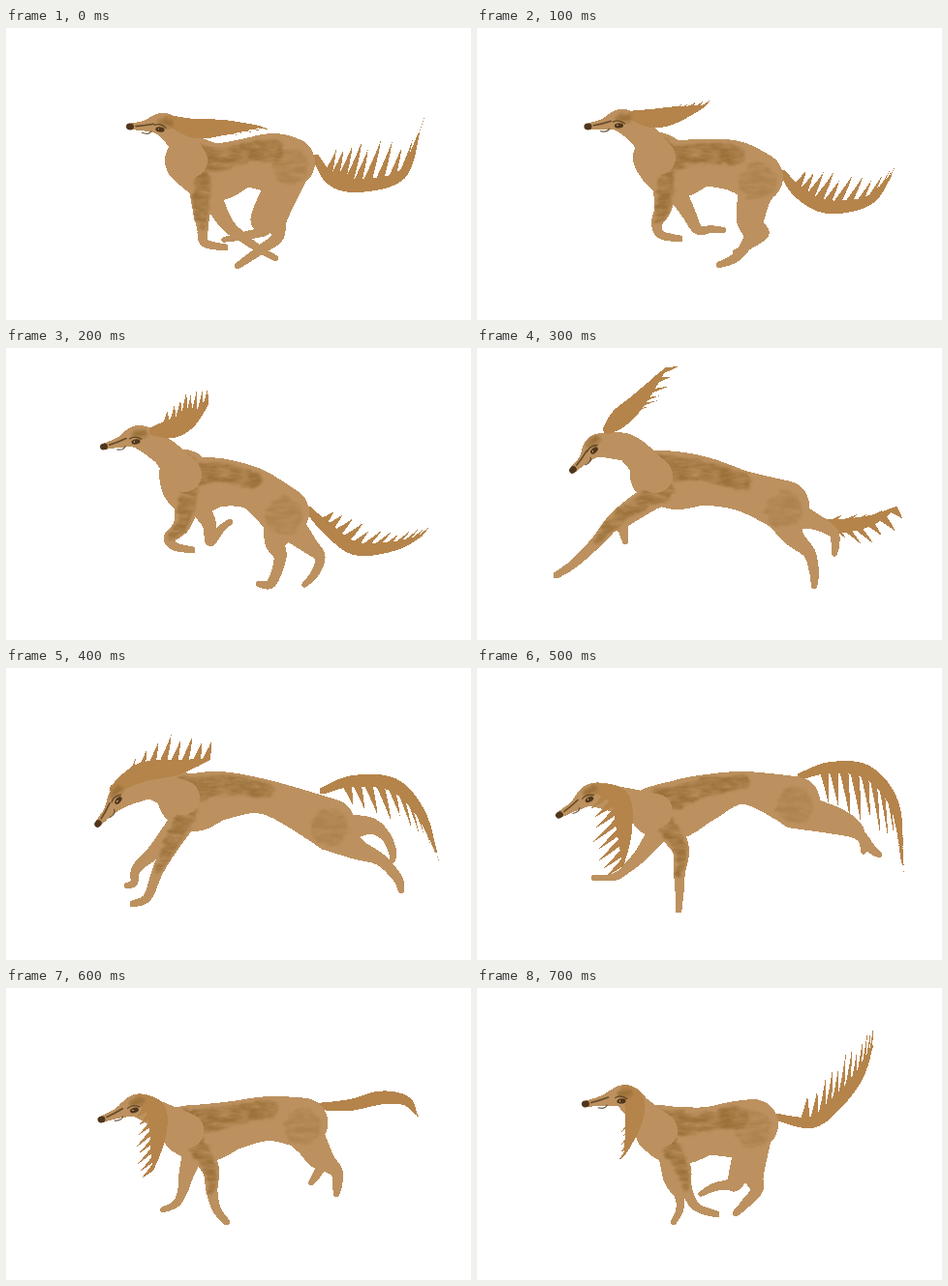
Animation, 480 px wide and 302 px high, one loop 800 ms. Source, as an HTML page:

```html
<!DOCTYPE html>
<html lang="en">
<head>
<meta charset="utf-8">
<title>Running hound</title>
<style>
html, body { margin: 0; width: 100%; height: 100%; overflow: hidden; background: #fff; }
svg { display: block; width: 100%; height: 100%; }
.body { fill: #bc915f; shape-rendering: crispEdges; }
.hair { fill: #b5844b; shape-rendering: crispEdges; }
.shade { fill: #9c723b; filter: url(#fur); }
.dark { fill: #4f361c; }
.line { fill: none; stroke: #4f361c; stroke-linecap: round; }
</style>
</head>
<body>
<svg id="stage" viewBox="0 0 480 302">
  <filter id="fur" x="-20%" y="-20%" width="140%" height="140%" color-interpolation-filters="sRGB">
    <feTurbulence type="fractalNoise" baseFrequency=".06 .18" numOctaves="3" seed="4" result="noise"/>
    <feColorMatrix in="noise" values="0 0 0 0 0  0 0 0 0 0  0 0 0 0 0  1.6 0 0 0 -.1" result="mottle"/>
    <feDisplacementMap in="SourceGraphic" in2="noise" scale="9" xChannelSelector="R" yChannelSelector="G"/>
    <feGaussianBlur stdDeviation="1"/>
    <feComposite in2="mottle" operator="in"/>
  </filter>
</svg>
<script>
const STEP = 100;

// Thickness along each part, shared by all poses.
const RADII = {
  head: [3.2, 5.5, 12, 14, 24],
  front: [15, 9, 6, 4.5, 3.5],
  hind: [20, 11, 6.5, 5, 3.2],
  tail: [3.5, 6, 7, 5, 1],
  ear: [5, 10, 8, 1]
};

const points = text => text.split(' ').map(pair => pair.split(',').map(Number));

// head: nose, skull, neck; trunk: chest to rump; legs: joints below shoulder or hip.
// tail and ear: centre line; the hair vectors give the pull of their strands.
function pose(head, trunk, waist, tail, tailHair, ear, earHair, front, hind, farFront, farHind) {
  const parts = { head, trunk, tail, tailHair, ear, earHair, front, hind, farFront, farHind };
  for (const key in parts) parts[key] = points(parts[key]);
  return { ...parts, waist };
}

const gathered = pose(
  '128,102 163,100 180,115', '190,137 215,149 245,140 275,139 293,139', 30,
  '320,134 336,157 365,163 408,152 426,110', '14,-42',
  '168,95 195,104 225,103 262,102', '24,6',
  '202,190 203,206 205,222 226,227', '280,195 280,216 262,230 239,246',
  '226,200 245,217 262,229 278,238', '262,196 268,209 245,215 225,219');

const pushing = pose(
  '101,102 138,92 163,107', '184,131 194,143 220,139 256,146 287,170', 22,
  '312,167 330,185 360,207 400,205 429,194', '20,-18',
  '153,86 172,83 189,75 207,60', '4,-30',
  '182,182 169,196 174,205 192,209', '278,200 283,217 274,243 261,244',
  '209,180 211,200 222,187 231,180', '312,203 324,216 319,233 308,245');

const leaping = pose(
  '99,126 125,101 155,103', '184,132 205,137 235,138 275,148 317,163', 21,
  '342,177 365,183 385,183 410,177 432,165', '24,-14 18,18',
  '135,84 148,72 167,54 195,21', '26,-8',
  '148,174 122,202 100,223 82,235', '326,194 343,212 348,232 348,246',
  '152,178 151,188 152,195 153,200', '345,178 367,190 370,203 369,213');

const flying = pose(
  '95,161 120,132 147,121', '182,134 194,139 222,132 270,134 334,161', 18,
  '327,127 358,117 400,121 428,150 444,190', '12,38',
  '112,125 140,108 175,103 209,95', '10,-32',
  '170,183 157,209 146,237 131,244', '362,187 386,198 404,217 408,230',
  '155,188 135,207 132,222 125,225', '373,163 391,173 399,190 399,199');

const landing = pose(
  '85,152 120,131 148,137', '184,148 204,147 231,136 275,124 328,138', 17,
  '334,112 365,103 403,108 431,142 439,201', '7,54',
  '122,124 147,135 152,168 151,203', '-30,26',
  '210,187 209,212 209,232 208,250', '370,161 393,171 406,186 415,193',
  '172,190 155,207 142,216 121,217', '370,153 391,163 398,178 399,190');

const folding = pose(
  '112,120 153,112 166,125', '189,147 208,153 238,148 268,146 285,141', 29,
  '308,133 345,139 371,119 394,91 408,60', '5,-42',
  '153,105 163,118 161,142 153,171', '-12,16',
  '212,187 216,207 226,226 247,234', '285,192 289,208 278,222 267,233',
  '200,197 209,215 209,230 203,242', '268,198 260,203 245,206 231,213');

const lerp = (a, b, t) => a.map((v, i) => v + (b[i] - v) * t);

function halfway(a, b) {
  if (typeof a === 'number') return (a + b) / 2;
  if (Array.isArray(a)) return a.map((v, i) => halfway(v, b[i]));
  return Object.fromEntries(Object.keys(a).map(key => [key, halfway(a[key], b[key])]));
}

const cycle = [
  gathered, halfway(gathered, pushing), pushing, leaping,
  flying, landing, halfway(landing, folding), folding
];

const stage = document.getElementById('stage');

function add(parent, tag, attrs) {
  const el = document.createElementNS('http://www.w3.org/2000/svg', tag);
  for (const key in attrs) el.setAttribute(key, attrs[key]);
  return parent.appendChild(el);
}

function random(seed) {
  return () => (seed = seed * 16807 % 2147483647) / 2147483647;
}

// Catmull-Rom point at t (0 to 1) along a list of equal-sized vectors.
function along(list, t) {
  const last = list.length - 1;
  const i = Math.min(last - 1, Math.floor(t * last)), u = t * last - i;
  const a = list[Math.max(0, i - 1)], b = list[i], c = list[i + 1], d = list[Math.min(last, i + 2)];
  return b.map((v, k) => v + u / 2 * (c[k] - a[k]
    + u * (2 * a[k] - 5 * v + 4 * c[k] - d[k] + u * (3 * (v - c[k]) + d[k] - a[k]))));
}

// A limb: one disc after another along a line, merged into a single path.
function limb(parent, name, line, radii, scale = 1) {
  const list = line.map(([x, y], i) => [x, y, radii[i] * scale]);
  const count = (list.length - 1) * 28;
  let d = '';
  for (let i = 0; i <= count; i++) {
    const [x, y, size] = along(list, i / count);
    const r = Math.max(.6, size);
    d += `M${x - r} ${y}a${r} ${r} 0 1 0 ${2 * r} 0a${r} ${r} 0 1 0 ${-2 * r} 0`;
  }
  return add(parent, 'path', { class: name, d });
}

// Pointed locks pulled from a line by the hair vectors.
function fringe(parent, line, pulls, count) {
  const rnd = random(count * 97);
  let d = '';
  for (let i = 0; i < count; i++) {
    const t = .2 + .75 * i / (count - 1);
    const p = along(line, t), q = along(line, t + .02);
    const step = Math.hypot(q[0] - p[0], q[1] - p[1]);
    const side = [0, 1].map(k => (q[k] - p[k]) / step * 5);
    const size = (.45 + .55 * Math.sin(Math.PI * t)) * (.85 + .3 * rnd());
    const pull = pulls[i % pulls.length].map(v => v * size);
    const at = (f, s) => [0, 1].map(k => p[k] + pull[k] * f + side[k] * s);
    d += `M${at(0, -1)}Q${at(.6, -.2)} ${at(1, 0)}Q${at(.6, .7)} ${at(0, 1)}Z`;
  }
  add(parent, 'path', { class: 'hair', d });
}

function drawHair(parent, line, radii, pulls, count) {
  limb(parent, 'hair', line, radii);
  fringe(parent, line, pulls, count);
}

function drawFace(parent, [nx, ny], [sx, sy]) {
  const dx = sx - 4 - nx, dy = sy + 5 - ny;
  const eye = Math.hypot(dx, dy);
  const angle = Math.atan2(dy, dx) * 180 / Math.PI;
  const g = add(parent, 'g', { transform: `translate(${nx} ${ny}) rotate(${angle})` });
  add(g, 'ellipse', { class: 'shade', cx: eye + 5, cy: -8, rx: 9, ry: 4.5 });
  add(g, 'ellipse', { class: 'dark', cx: 0, cy: 0, rx: 4, ry: 3.4 });
  const stroke = (d, width) => add(g, 'path', { class: 'line', d, 'stroke-width': width, opacity: .8 });
  stroke('M6 -1Q14 -2 24 -5', 1.6);
  stroke('M13 5Q20 7 22 3', 1.2);
  stroke(`M${eye - 6} -4Q${eye} -7 ${eye + 6} -2`, 1.3);
  add(g, 'ellipse', { class: 'dark', cx: eye, cy: 0, rx: 4.6, ry: 2.6 });
  add(g, 'circle', { class: 'body', cx: eye - 1.5, cy: -.3, r: .9 });
}

function drawHound(p) {
  const g = add(stage, 'g', { display: 'none' });
  const girth = [26, 30, 25, p.waist, 26];
  const [nose, skull, neck] = p.head;
  const rump = p.trunk[4];
  const chest = lerp(p.trunk[0], p.trunk[1], .5);
  const shoulder = [chest[0], chest[1] + 12];
  const hip = [rump[0], rump[1] + 8];

  drawHair(g, p.tail, RADII.tail, p.tailHair, 12);
  limb(g, 'body', [shoulder, ...p.farFront], RADII.front, .85);
  limb(g, 'body', [hip, ...p.farHind], RADII.hind, .85);
  limb(g, 'body', p.trunk, girth);
  limb(g, 'body', [hip, ...p.hind], RADII.hind);
  limb(g, 'body', [shoulder, ...p.front], RADII.front);

  const back = p.trunk.slice(0, 4).map(([x, y], i) => [x, y - girth[i] * .42]);
  limb(g, 'shade', back, girth, .4);
  limb(g, 'shade', [shoulder, p.front[0], p.front[1]], [9, 7, 3]);
  add(g, 'circle', { class: 'shade', cx: rump[0], cy: rump[1] + 4, r: 19, opacity: .45 });

  limb(g, 'body', [nose, lerp(nose, skull, .45), skull, neck], RADII.head);
  limb(g, 'body', [skull, neck, p.trunk[0]], [12, 14, 18]);
  drawHair(g, p.ear, RADII.ear, p.earHair, 8);
  drawFace(g, nose, skull);
  return g;
}

const groups = cycle.map(drawHound);
let shown = -1;

function render(time) {
  const index = Math.floor(time / STEP) % groups.length;
  if (index === shown) return;
  groups.forEach((g, i) => g.setAttribute('display', i === index ? 'inline' : 'none'));
  shown = index;
}

const start = performance.now();
function tick() {
  render(performance.now() - start);
  requestAnimationFrame(tick);
}
tick();
</script>
</body>
</html>
```
